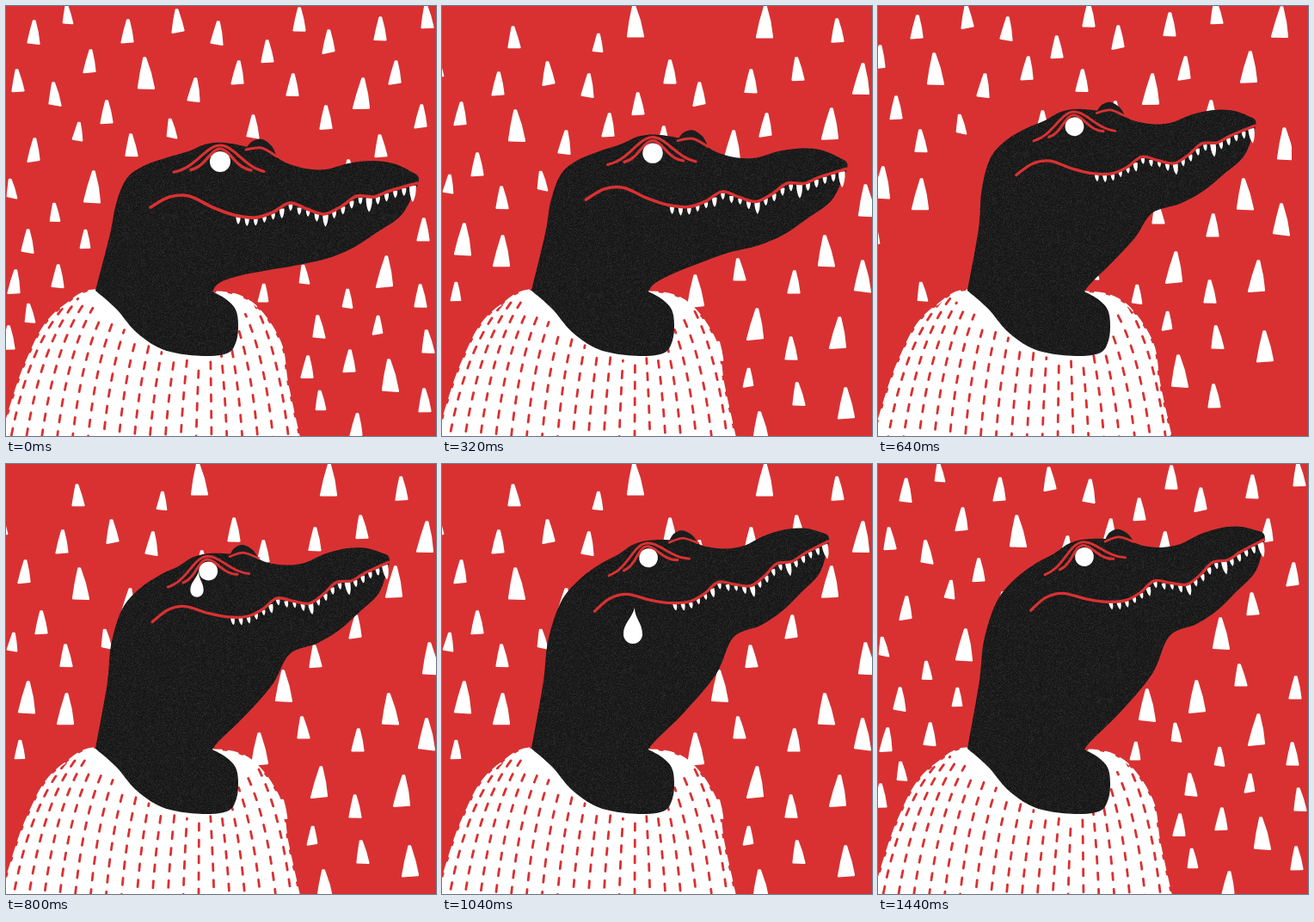
An HTML page with a canvas that plays this animation: 500x500 px, repeating every 1.52 s.

```html
<!DOCTYPE html>
<html lang="en">
<head>
<meta charset="utf-8">
<title>Crocodile tears</title>
<style>
html, body { margin: 0; width: 100%; height: 100%; overflow: hidden; background: #d93132; }
canvas { display: block; width: 500px; height: 500px; }
</style>
</head>
<body>
<canvas id="stage" width="500" height="500"></canvas>
<script>
const RED = '#d93132', WHITE = '#fff', INK = '#1d1d1d';
const STEP = 80, STEPS = 19;
const ctx = document.getElementById('stage').getContext('2d');

const points = text => text.trim().split(/\s+/).map(p => p.split(',').map(Number));
const clamp = v => Math.max(0, Math.min(1, v));
const smooth = t => t * t * (3 - 2 * t);
const mix = (a, b, t) => a + (b - a) * t;

function seeded(seed) {
  return () => {
    seed = (seed + 0x6d2b79f5) | 0;
    let t = Math.imul(seed ^ (seed >>> 15), 1 | seed);
    t = (t + Math.imul(t ^ (t >>> 7), 61 | t)) ^ t;
    return ((t ^ (t >>> 14)) >>> 0) / 4294967296;
  };
}

// Smooth curve through points, continuing the current path.
function curve(p) {
  for (let i = 0; i < p.length - 1; i++) {
    const a = p[i - 1] || p[i], b = p[i], c = p[i + 1], d = p[i + 2] || c;
    ctx.bezierCurveTo(
      b[0] + (c[0] - a[0]) / 6, b[1] + (c[1] - a[1]) / 6,
      c[0] - (d[0] - b[0]) / 6, c[1] - (d[1] - b[1]) / 6, c[0], c[1]);
  }
}

function trace(p) {
  ctx.beginPath();
  ctx.moveTo(...p[0]);
  curve(p);
}

function line(p, width) {
  trace(p);
  ctx.lineWidth = width;
  ctx.stroke();
}

// ---- Triangles: one wide field, seen through three windows in turn ----
const windows = [[0, 0], [-76, 61], [-96, -5]];
const FIELD_END = 577;
const small = points(`28,357 299,334 397,340 347,312 366,458 257,-18 72,10 92,271 432,371
  83,146 193,142 7,212 57,240 148,337`);
const medium = points(`32,30 97,64 57,102 245,31 452,77 536,-33 60,314 399,413 141,29 200,17
  218,97 333,92 14,87 146,162 32,167 9,320 3,385 350,420 490,12 485,260 160,-24 269,77 304,53
  341,15 117,123 482,128 422,246 482,337 364,373 25,273 407,487 287,140 375,41 435,26 372,129
  487,458 491,390 436,163`);
const large = points(`413,102 100,210 440,309 447,429 546,401 371,270 527,76 301,-44 163,78
  399,197 313,280 451,-43 523,224 536,319 145,224 563,24 570,165 565,253`);

function triangle(x, y, h) {
  const r = seeded(x * 613 + y * 37), wob = n => (r() - .5) * n;
  const half = h / 4 - .6, lean = wob(5), top = y - h / 2 + 1.5, low = y + h / 2 - 1.5;
  ctx.beginPath();
  ctx.moveTo(x + lean - .8, top);
  ctx.lineTo(x + lean + .8, top);
  ctx.lineTo(x + half * .65 + lean / 2, y);
  ctx.lineTo(x + half, low + wob(3));
  ctx.lineTo(x - half, low + wob(3));
  ctx.lineTo(x - half * .6 + lean / 2, y);
  ctx.closePath();
  ctx.fill();
  ctx.stroke();
}

function drawField(phase) {
  ctx.save();
  ctx.translate(...windows[phase]);
  ctx.beginPath();
  ctx.rect(-10, -70, FIELD_END + 10, 600);
  ctx.clip();
  ctx.fillStyle = ctx.strokeStyle = WHITE;
  ctx.lineWidth = 2.4;
  [small, medium, large].forEach((spots, size) =>
    spots.forEach(([x, y]) => triangle(x, y, [23, 28, 38][size])));
  ctx.restore();
}

// ---- Sweater ----
const shoulders = points(`-6,505 14,440 28,405 45,372 68,349 103,331 170,345 240,333
  285,345 318,390 327,440 341,504`);
const COLUMNS = 19;

function drawSweater(phase) {
  ctx.fillStyle = ctx.strokeStyle = WHITE;
  ctx.setLineDash([11, 8]);
  ctx.lineDashOffset = phase * 6;
  line(shoulders, 3);
  ctx.fill();

  ctx.save();
  ctx.clip();
  ctx.strokeStyle = RED;
  ctx.lineWidth = 2.8;
  ctx.setLineDash([8, 11]);
  for (let i = 0; i < COLUMNS; i++) {
    // Stitches start along the neckline and fan out to the hem.
    const t = i / (COLUMNS - 1);
    const x = 78 + 206 * mix(t, smooth(t), .6);
    const y = 338 + 75 * Math.sin(Math.PI * t ** 1.6);
    const end = 8 + i * 18 + (phase - 1) * 3;
    ctx.lineDashOffset = (i * 7 + phase * 6) % 19;
    ctx.beginPath();
    ctx.moveTo(x, y);
    ctx.quadraticCurveTo(mix(end, x, .3), y + 50, end, 506);
    ctx.stroke();
  }
  ctx.restore();
  ctx.setLineDash([]);
}

// ---- Crocodile, drawn with its head low, then bent upwards ----
const EYE = [249, 181];
const head = points(`104,331 121,265 128,230 140,201 160,186 188,176 212,169 235,160 262,160
  305,171 325,182 348,189 372,190 398,183 425,180 450,183 470,192 480,201 472,222 458,245
  430,264 402,282 372,294 335,302 300,308 270,314 248,322 240,332`);
const collar = points(`240,332 256,341 267,353 270,370 268,389 259,403 235,407 200,404 175,396
  150,378 128,352 104,331`);
const mouth = points(`168,234 190,222 213,221 240,234 265,243 290,246 310,240 330,229 350,236
  370,242 390,233 408,221 428,222 446,215 478,206`);
const ear = points('31,-17 38,-24 49,-26 60,-18 66,-6');
const earFold = points('30,-14 48,-16 66,-6');
const TEETH = 21, GUM = [265, 478];

function bell(from, to, base, height, spread) {
  const p = [];
  for (let x = from; x <= to; x += 7) p.push([x, base - height * Math.exp(-((x / spread) ** 2))]);
  return p;
}
const lid = bell(-34, 37, 11, 26, 20);
const brow = bell(-54, 52, 14, 33, 32);

function poseAt(k) {
  const lift = smooth(clamp((k - 1) / 13));
  return {
    lift,
    x: EYE[0] - 9 * lift - 16 * Math.sin(Math.PI * lift) ** 2,
    y: EYE[1] - 73 * lift,
    tilt: -.204 * lift,
    scale: 1 - .09 * clamp(lift * 1.8)
  };
}

// The neck follows the head gradually and swells while stretched.
function bend([px, py], { lift, x, y, tilt, scale }) {
  const w = clamp((Math.max(0, 330 - py) / 150) ** 2 + Math.max(0, px - 248) / 80);
  const dx = (px - EYE[0]) * scale, dy = (py - EYE[1]) * scale;
  const c = Math.cos(tilt), s = Math.sin(tilt);
  const swell = (px - 200) * .6 * w * (1 - w) * lift;
  return [mix(px, x + dx * c - dy * s, w) + swell, mix(py, y + dx * s + dy * c, w)];
}

function makeGrain() {
  const tile = document.createElement('canvas');
  tile.width = tile.height = 256;
  const g = tile.getContext('2d'), img = g.createImageData(256, 256), r = seeded(9);
  for (let i = 0; i < img.data.length; i += 4) {
    const v = 21 + 22 * r() ** 2;
    img.data.set([v, v, v, 255], i);
  }
  g.putImageData(img, 0, 0);
  return ctx.createPattern(tile, 'repeat');
}
const grain = makeGrain();

function fillGrain(k) {
  ctx.save();
  ctx.clip();
  ctx.translate(-(k * 67 % 256), -(k * 41 % 256));
  ctx.fillStyle = grain;
  ctx.fillRect(0, 0, 760, 760);
  ctx.restore();
}

function drawTeeth() {
  const r = seeded(4);
  ctx.fillStyle = WHITE;
  for (let i = 0; i < TEETH; i++) {
    // Every fifth tooth is a fang, larger towards the snout.
    const len = i % 5 ? 7 + 3 * r() : 9 + i * .5;
    const x = mix(...GUM, (i + .5) / TEETH), w = 1.3 + len * .14;
    const n = mouth.findIndex(p => p[0] >= x);
    const [ax, ay] = mouth[n - 1], [bx, by] = mouth[n];
    const y = mix(ay, by, (x - ax) / (bx - ax)) + 1.5;
    ctx.beginPath();
    ctx.moveTo(x - w, y);
    ctx.quadraticCurveTo(x - w, y + len * .7, x, y + len);
    ctx.quadraticCurveTo(x + w, y + len * .7, x + w, y);
    ctx.fill();
  }
}

function drawCroc(k) {
  const pose = poseAt(k);
  trace(head.map(p => bend(p, pose)));
  curve(collar);
  fillGrain(k);

  ctx.save();
  ctx.translate(pose.x, pose.y);
  ctx.rotate(pose.tilt);
  ctx.scale(pose.scale, pose.scale);
  ctx.strokeStyle = RED;

  ctx.save();
  ctx.translate(-EYE[0], -EYE[1]);
  drawTeeth();
  line(mouth, 3.6);
  ctx.restore();

  trace(ear);
  ctx.fillStyle = INK;
  ctx.fill();
  line(earFold, 3);
  line(brow, 3.2);
  line(lid, 3.4);
  ctx.fillStyle = WHITE;
  ctx.beginPath();
  ctx.arc(0, 0, 12, 0, 7);
  ctx.fill();
  ctx.restore();
}

// ---- Tear: swells below the eye, then drops ----
function drawTear(k) {
  const age = k - 10;
  if (age < 0 || age > 6) return;
  const fall = Math.max(0, age - 3), size = Math.min(1, .7 + age * .1);
  const x = 222 - 3 * fall, y = 140 + 16 * age + 38 * fall + 5 * fall * fall;
  const r = 11 * size, h = 42 * size, top = y - h / 2, low = y + h / 2 - r;
  ctx.fillStyle = WHITE;
  ctx.beginPath();
  ctx.moveTo(x + 2, top);
  ctx.bezierCurveTo(x + 2, y - h * .2, x + r, y - h * .08, x + r, low);
  ctx.arc(x, low, r, 0, Math.PI);
  ctx.bezierCurveTo(x - r, y - h * .08, x - 1, y - h * .2, x + 2, top);
  ctx.fill();
}

function draw(k) {
  ctx.fillStyle = RED;
  ctx.fillRect(0, 0, 500, 500);
  drawField(k % 3);
  drawSweater(k % 3);
  drawCroc(k);
  drawTear(k);
}

ctx.lineCap = ctx.lineJoin = 'round';
const start = performance.now();
let shown = -1;
function tick() {
  const k = Math.floor((performance.now() - start) / STEP) % STEPS;
  if (k !== shown) draw(shown = k);
  requestAnimationFrame(tick);
}
tick();
</script>
</body>
</html>
```
